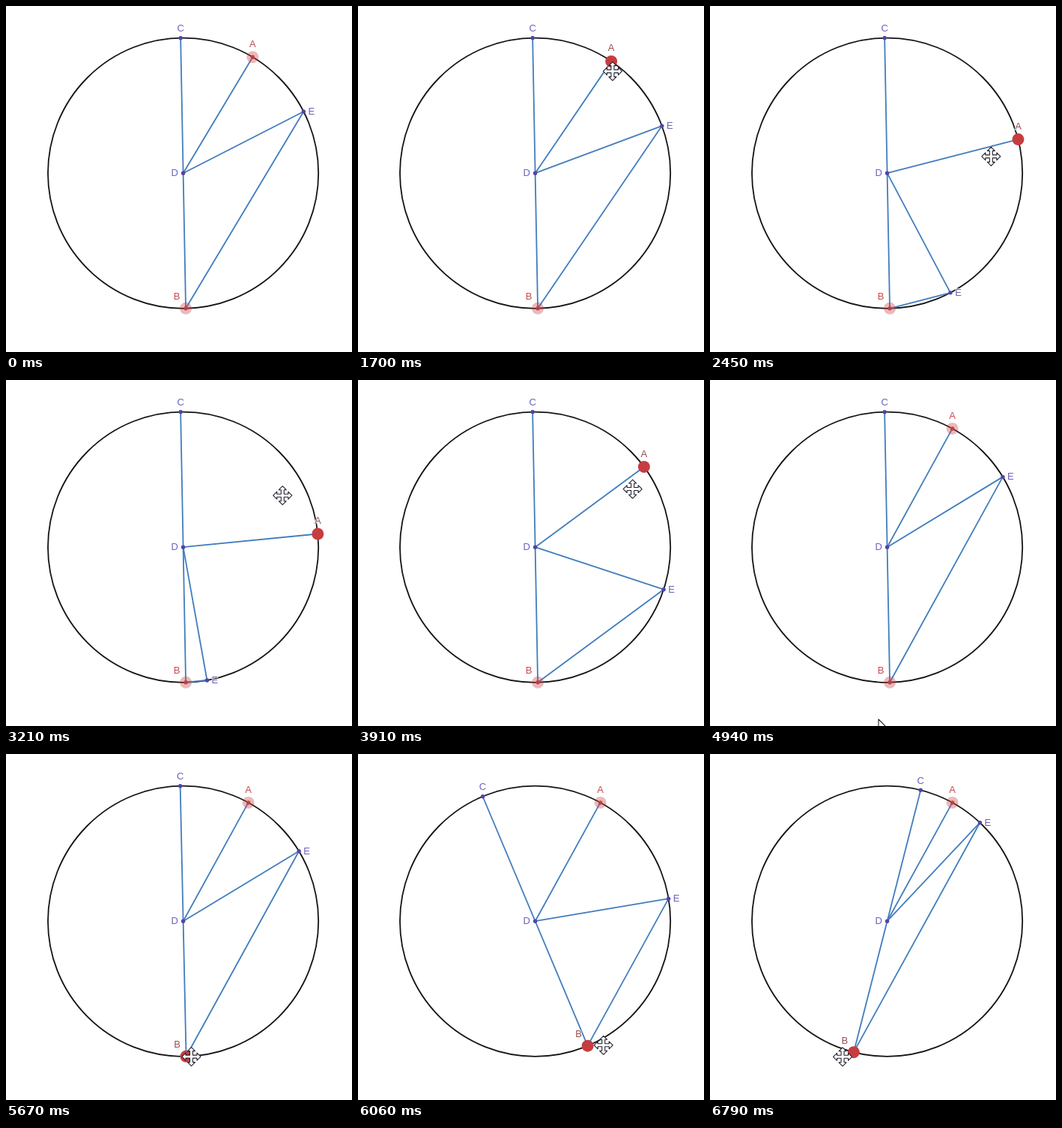
An HTML page that plays this animation: 462 px wide and 462 px high, repeating every 6880 ms.

```html
<!DOCTYPE html>
<html lang="en">
<head>
<meta charset="utf-8">
<title>Circle geometry</title>
<style>
  html, body { margin: 0; width: 100%; height: 100%; overflow: hidden; background: #fff; }
  svg { display: block; width: 100vw; height: 100vh; }
  text {
    font: 13px "Liberation Sans", Arial, sans-serif; text-anchor: middle;
    fill: #6b62b6; stroke: #fff; stroke-width: 1.6px; paint-order: stroke;
  }
  .outline { fill: none; stroke: #141414; stroke-width: 1.8; }
  .chord { stroke: #427dbd; stroke-width: 1.8; }
  .dot { fill: #5244a6; }
  .handle .dot, .halo { fill: #c63d40; }
  .halo { fill-opacity: .36; }
  .handle text { fill: #c24c50; }
  .dragged .halo { fill-opacity: 1; }
  .dragged text { fill: #94504f; }
  .cursor { fill: #fff; stroke: #20222e; stroke-width: 1.1; stroke-linejoin: round; }
</style>
</head>
<body>
<svg id="stage" viewBox="0 0 462 462"></svg>
<script>
const LOOP = 6880, LAST_MOVE = 6790;
const CENTER = { x: 236.6, y: 223.2 }, RADIUS = 180.6;
const LEAD = 90; // the dragged point trails the cursor by this many ms
const EXIT = { x: 225, y: 453 }, EXIT_TIME = 4940, RETURN_TIME = 5500;

const stage = document.getElementById('stage');
const SVG = 'http://www.w3.org/2000/svg';

function set(el, attrs) {
  for (const key in attrs) el.setAttribute(key, attrs[key]);
}

function add(tag, attrs, parent = stage) {
  const el = parent.appendChild(document.createElementNS(SVG, tag));
  set(el, attrs);
  return el;
}

const progress = (t, from, to) => Math.min(1, Math.max(0, (t - from) / (to - from)));
const ease = p => (1 - Math.cos(Math.PI * p)) / 2;
const mix = (p, q, k) => ({ x: p.x + (q.x - p.x) * k, y: p.y + (q.y - p.y) * k });

// Swings to and fro between turning points.
const swing = turns => t => turns.slice(1).reduce(
  (angle, turn, i) => angle + (turn.angle - turns[i].angle) * ease(progress(t, turns[i].time, turn.time)),
  turns[0].angle);

// Angles are in degrees, clockwise from the top.
const dragA = [
  { time: 1470, angle: 30.9 }, { time: 3086, angle: 98 }, { time: 3535, angle: 22 },
  { time: 4050, angle: 60 }, { time: 4620, angle: 28.8 }
];
const dragC = [{ time: 5640, angle: -1.1 }, { time: 6360, angle: -35.5 }, { time: 6880, angle: 18.2 }];
const angleA = swing(dragA), angleC = swing(dragC);
const grabA = dragA[0].time, dropA = dragA[dragA.length - 1].time, grabB = dragC[0].time;

function polar(degrees, radius = RADIUS) {
  const a = degrees * Math.PI / 180;
  return { x: CENTER.x + radius * Math.sin(a), y: CENTER.y - radius * Math.cos(a) };
}

// While A turns away from the top, the cursor cuts inside the circle.
function cursorNearA(t) {
  const angle = angleA(t + LEAD);
  return polar(angle, RADIUS + 1 - 6 * Math.sqrt(Math.max(0, angle - 34)));
}
const cursorNearB = t => polar(angleC(t + LEAD) + 180, RADIUS + 10 * progress(t, grabB, grabB + 500));

function cursorAt(t) {
  if (t < dropA) return cursorNearA(t);
  if (t < EXIT_TIME) return mix(cursorNearA(dropA), EXIT, progress(t, dropA, EXIT_TIME) ** 2);
  if (t < grabB) return mix(EXIT, cursorNearB(grabB), ease(progress(t, EXIT_TIME, RETURN_TIME)));
  return cursorNearB(t);
}

function makePoint(name, dx, dy, isHandle) {
  const group = add('g', isHandle ? { class: 'handle' } : {});
  if (isHandle) add('circle', { r: 8, class: 'halo' }, group);
  add('circle', { r: 2.7, class: 'dot' }, group);
  add('text', { x: dx, y: dy + 4.6 }, group).textContent = name;
  return group;
}

add('circle', { cx: CENTER.x, cy: CENTER.y, r: RADIUS, class: 'outline' });
const chords = ['CB', 'DA', 'DE', 'BE'].map(ends => ({ ends, line: add('line', { class: 'chord' }) }));
const points = {
  C: makePoint('C', 0, -13),
  D: makePoint('D', -11.5, -1),
  E: makePoint('E', 10.5, -0.5),
  A: makePoint('A', 0, -18, true),
  B: makePoint('B', -12, -16, true)
};

const quarter = 'M0-12.5L5-7.5H2V-2H7.5V-5L12.5 0L7.5 5V2H2V7.5H5L0 12.5';
const moveCursor = add('path', { class: 'cursor', d: quarter + 'L-5 7.5H-2V2H-7.5V5L-12.5 0L-7.5-5V-2H-2V-7.5H-5Z' });
const arrowCursor = add('path', { class: 'cursor', d: 'M0 0V16L4 12.5L6.5 18.5L9 17.5L6.5 11.5H11.5Z' });

function render(t) {
  const a = angleA(t), c = angleC(t);
  // BE stays parallel to DA, so the arc CE is twice the arc CA.
  const at = { A: polar(a), B: polar(c + 180), C: polar(c), D: CENTER, E: polar(2 * a - c) };

  for (const { ends: [from, to], line } of chords) {
    set(line, { x1: at[from].x, y1: at[from].y, x2: at[to].x, y2: at[to].y });
  }
  for (const name in points) {
    set(points[name], { transform: `translate(${at[name].x} ${at[name].y})` });
  }
  points.A.classList.toggle('dragged', t >= grabA && t < dropA);
  points.B.classList.toggle('dragged', t >= grabB);

  const { x, y } = cursorAt(t);
  const free = t > dropA + 50 && t < RETURN_TIME - 50;
  const shown = t < grabA ? null : free ? arrowCursor : moveCursor;
  for (const cursor of [moveCursor, arrowCursor]) {
    set(cursor, { transform: `translate(${x} ${y})`, visibility: cursor === shown ? 'visible' : 'hidden' });
  }
}

const start = performance.now();
function tick() {
  render(Math.min((performance.now() - start) % LOOP, LAST_MOVE));
  requestAnimationFrame(tick);
}
tick();
</script>
</body>
</html>
```
